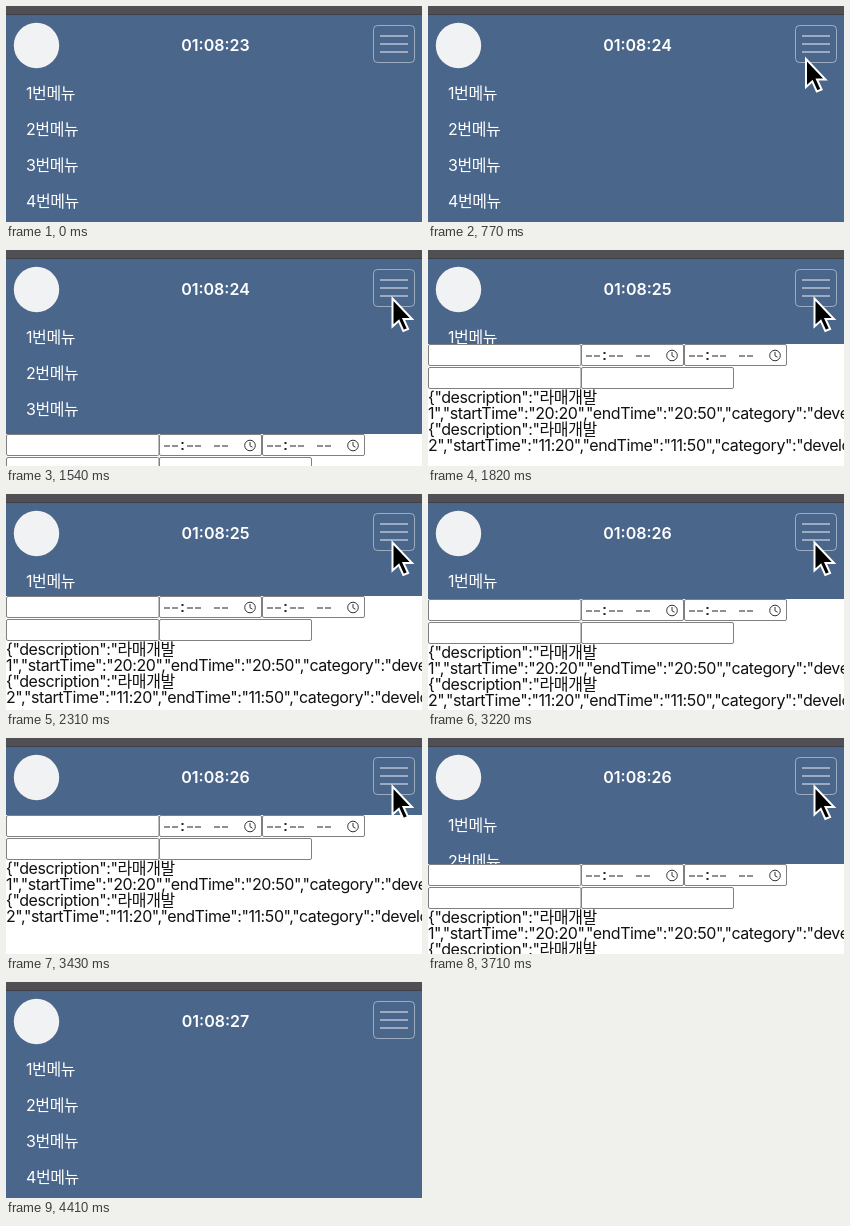
Recreate the animation shown at these times as an HTML page. Size 416x216 px, loop 4480 ms.

```html
<!DOCTYPE html>
<html lang="ko">
<head>
<meta charset="utf-8">
<style>
  html, body { margin: 0; width: 100%; height: 100%; overflow: hidden; background: #4b668b; }
  svg { display: block; width: 416px; height: 216px; }
  text { font: 16px Inter, "Noto Sans CJK KR", "Noto Sans CJK", sans-serif; letter-spacing: -.42px; white-space: pre; }
  #clock { font-weight: 600; letter-spacing: 0; text-anchor: middle; }
  .light { fill: #fff; }
  .json { fill: #111; }
  .field { fill: #fff; stroke: #808080; }
  .icon { fill: none; stroke: #333; }
</style>
</head>
<body>
<svg id="stage" viewBox="0 0 416 216">
  <rect width="416" height="216" fill="#4b668b"/>
  <g id="menu" class="light"></g>
  <g id="page"><rect width="416" height="216" fill="#fff"/></g>
  <rect width="416" height="9" fill="#504f54"/>
  <rect y="8" width="416" height="1" fill="#3f4045"/>
  <circle cx="30.5" cy="39.5" r="22.7" fill="#f1f2f3"/>
  <text id="clock" class="light" x="209.5" y="45"></text>
  <g fill="none" stroke="#fff">
    <rect x="367.5" y="19.5" width="41" height="37" rx="4" stroke-opacity=".45"/>
    <path d="M374 30H402M374 38H402M374 46H402" stroke-opacity=".6" stroke-width="1.5"/>
  </g>
  <path id="cursor" d="M0 0V28L6.3 22.3L10.8 32.5L15.6 30.5L11 20.5H19.5Z" fill="#000" stroke="#fff" stroke-width="2"/>
</svg>
<script>
const LOOP = 4480, STEP = 70;
const CLOSED = 72, OPEN = 220, SLIDE = 740;
const TOGGLES = [1408, 2192, 2866, 3540];
const FIRST_TICK = 740;
// Cursor tip as [time, x, y]
const PATH = [[350, 346, 220], [560, 366, 150], [770, 378, 53], [1050, 386.5, 48.5],
              [4130, 386.5, 48.5], [4235, 382, 90], [4390, 366, 220]];

const $ = id => document.getElementById(id);

function add(parent, tag, attrs, content = '') {
  const el = document.createElementNS('http://www.w3.org/2000/svg', tag);
  for (const key in attrs) el.setAttribute(key, attrs[key]);
  el.textContent = content;
  parent.append(el);
  return el;
}

function field(x, y, width) {
  add($('page'), 'rect', { class: 'field', x: x + .5, y, width: width - 1, height: 21, rx: 1.5 });
}

function timeField(x) {
  field(x, .5, 103);
  add($('page'), 'path', {
    d: [5, 28, 55].map(dx => `M${x + dx} 12h6m2 0h6`).join(''),
    fill: 'none', stroke: '#222', 'stroke-width': 1.2
  });
  for (const y of [8, 14])
    add($('page'), 'rect', { x: x + 22.5, y, width: 2, height: 2, fill: '#222' });
  add($('page'), 'circle', { class: 'icon', cx: x + 91, cy: 11.5, r: 5.3 });
  add($('page'), 'path', { class: 'icon', d: `M${x + 91} 8V11.8L${x + 93.5} 13.2` });
}

for (let i = 0; i < 4; i++)
  add($('menu'), 'text', { x: 20, y: 93 + 36 * i }, `${i + 1}번메뉴`);

field(0, .5, 153.5);
timeField(153);
timeField(256);
field(0, 23.5, 153.5);
field(153, 23.5, 153);

[['20:20', '20:50'], ['11:20', '11:50']].forEach(([start, end], i) => {
  const y = 59 + 32 * i;
  add($('page'), 'text', { class: 'json', x: 0, y }, '{"description":"라매개발');
  add($('page'), 'text', { class: 'json', x: 0, y: y + 16 },
    `${i + 1}","startTime":"${start}","endTime":"${end}","category":"develop"}`);
});

// CSS "ease": cubic-bezier(.25, .1, .25, 1)
function ease(p) {
  if (p <= 0 || p >= 1) return p <= 0 ? 0 : 1;
  const bezier = (a, b, u) => 3 * a * u * (1 - u) ** 2 + 3 * b * u * u * (1 - u) + u ** 3;
  let lo = 0, hi = 1;
  for (let i = 0; i < 24; i++) {
    const mid = (lo + hi) / 2;
    if (bezier(.25, .25, mid) < p) lo = mid; else hi = mid;
  }
  return bezier(.1, 1, lo);
}

function navBottom(t) {
  let bottom = OPEN;
  TOGGLES.forEach((start, i) => {
    const goal = i % 2 ? OPEN : CLOSED;
    if (t >= start) bottom += (goal - bottom) * ease((t - start) / SLIDE);
  });
  return bottom;
}

function cursorAt(t) {
  const i = PATH.findIndex(point => point[0] > t);
  if (i < 1) return [0, 300];
  const [t0, x0, y0] = PATH[i - 1], [t1, x1, y1] = PATH[i];
  const p = (t - t0) / (t1 - t0);
  return [x0 + (x1 - x0) * p, y0 + (y1 - y0) * p];
}

function draw(t) {
  const second = 23 + Math.max(0, Math.floor((t - FIRST_TICK) / 1000) + 1);
  $('clock').textContent = `01:08:${second}`;
  $('page').setAttribute('transform', `translate(0 ${Math.round(navBottom(t))})`);
  $('cursor').setAttribute('transform', `translate(${cursorAt(t)})`);
}

const begin = performance.now();
function tick() {
  const t = (performance.now() - begin) % LOOP;
  draw(Math.floor(t / STEP) * STEP);
  requestAnimationFrame(tick);
}
tick();
</script>
</body>
</html>
```
